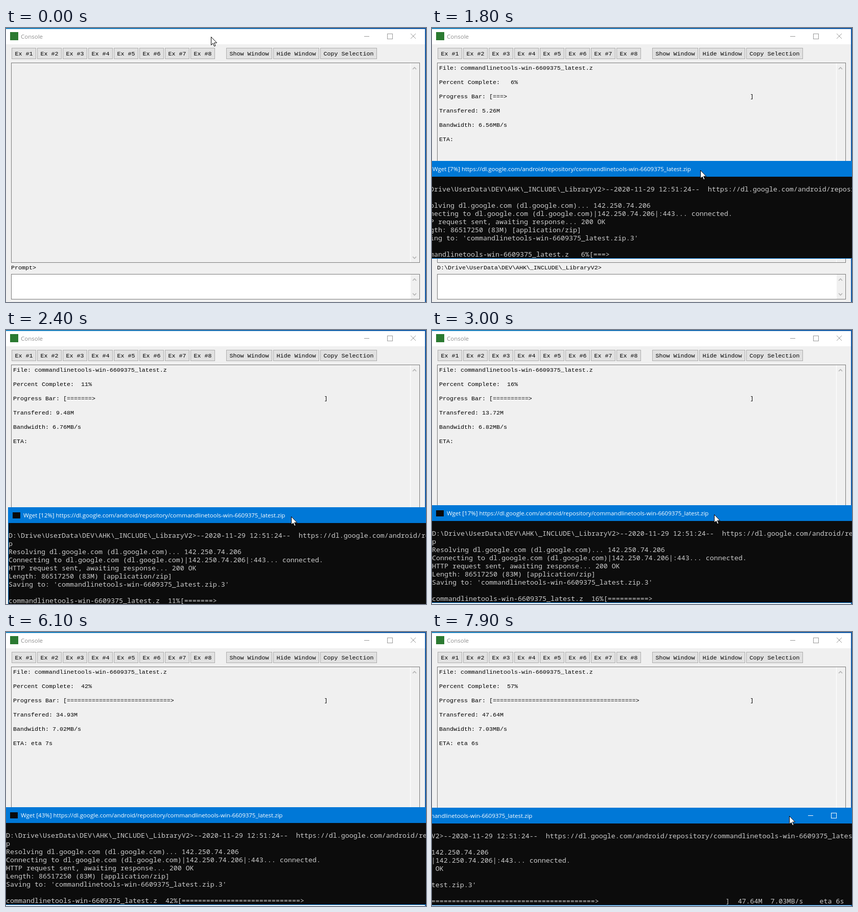
Recreate the animation shown at these times as an HTML page. Size 822 by 538 pixels, loop 8000 ms.

```html
<!DOCTYPE html>
<html lang="en">
<head>
<meta charset="utf-8">
<title>Console</title>
<style>
  html, body { margin: 0; width: 100%; height: 100%; overflow: hidden; background: #f0f0f0; }
  svg { display: block; }
  text { white-space: pre; }
  .mono { font: 11.667px "Liberation Mono", "Courier New", monospace; fill: #000; }
  .ui { font: 11.5px "Open Sans", "Noto Sans", sans-serif; }
  .term { font: 13.333px "Noto Sans Mono", "DejaVu Sans Mono", monospace; fill: #ccc; }
</style>
</head>
<body>
<svg id="stage" width="822" height="538" viewBox="0 0 822 538">
  <defs>
    <linearGradient id="desk">
      <stop offset="0" stop-color="#1c86c2"/>
      <stop offset="1" stop-color="#1058a6"/>
    </linearGradient>
  </defs>
</svg>
<script>
const LOOP = 8000;
const SIZE = 86517250 / 1048576;
const BAR = 72;
const FILE = "commandlinetools-win-6609375_latest.z";
const URL_TEXT = "https://dl.google.com/android/repository/" + FILE + "ip";
const PATH = "D:\\Drive\\UserData\\DEV\\AHK\\_INCLUDE\\_LibraryV2>";

// [time, value, ...] keys
const LOADED = [[1000, 0.02], [1400, 2.58], [1800, 5.26], [2400, 9.48], [4400, 23.6], [6000, 34.93], [7800, 47.64], [8000, 49.05]];
const SPEED = [[1000, 6.3], [1400, 6.46], [1800, 6.56], [2400, 6.76], [4400, 6.95], [6000, 7.02], [7800, 7.03]];
const TERMINAL = [[1600, 500, 400], [1700, 150, 305], [1800, -29, 261], [2100, -6, 318], [2400, 4, 348],
  [2800, -1, 344], [7000, -1, 344], [7200, -50, 346], [7700, -290, 346], [7900, -346, 345], [8000, -356, 345]];
const POINTER = [[0, 401, 17], [100, 401, 17], [450, 380, 47], [800, 384, 48], [900, 420, 60], [1300, 840, 400], [1600, 1054, 418]];

const stage = document.getElementById("stage");

function add(parent, tag, attrs, content = "") {
  const el = document.createElementNS("http://www.w3.org/2000/svg", tag);
  for (const key in attrs) el.setAttribute(key, attrs[key]);
  el.textContent = content;
  parent.appendChild(el);
  return el;
}
const rect = (p, x, y, width, height, fill) => add(p, "rect", { x, y, width, height, fill });
const box = (p, x, y, w, h, fill, stroke) =>
  add(p, "rect", { x: x + .5, y: y + .5, width: w - 1, height: h - 1, fill, stroke });
const label = (p, cls, x, y, content) => add(p, "text", { class: cls, x, y }, content);
const line = (p, d, stroke, width = 1) =>
  add(p, "path", { d, stroke, fill: "none", "stroke-width": width });

function captionButtons(p, x, y, color) {
  line(p, `M${x} ${y + 5.5}h10`, color);
  box(p, x + 45, y, 11, 11, "none", color);
  line(p, `M${x + 91} ${y}l10 10m0-10l-10 10`, color);
}

function scrollBar(p, y, h, up, down) {
  rect(p, 791, y, 18, h, "#f0f0f0");
  line(p, `M791.5 ${y}v${h}`, "#fff");
  line(p, `M796 ${up + 2}l3.5-3.5 3.5 3.5M796 ${down - 2}l3.5 3.5 3.5-3.5`, "#b5b5b5", 1.7);
}

function sample(keys, t) {
  if (t <= keys[0][0]) return keys[0].slice(1);
  const i = keys.findIndex(k => k[0] > t);
  if (i < 0) return keys[keys.length - 1].slice(1);
  const a = keys[i - 1], b = keys[i];
  const u = (t - a[0]) / (b[0] - a[0]);
  return a.slice(1).map((v, n) => v + (b[n + 1] - v) * u);
}

// main window
rect(stage, 0, 0, 822, 538, "url(#desk)");
rect(stage, 0, 2, 820, 30, "#fff");
rect(stage, 0, 32, 820, 506, "#f0f0f0");
rect(stage, 8, 8, 16, 16, "#2b7a31");
label(stage, "ui", 29, 21, "Console").setAttribute("fill", "#8f8f8f");
captionButtons(stage, 701, 11, "#999");

function button(x, w, caption) {
  const face = box(stage, x, 39, w, 22, "#e1e1e1", "#adadad");
  label(stage, "mono", x + (w - caption.length * 7) / 2, 54, caption);
  return face;
}
let lastExample;
for (let i = 0; i < 8; i++) lastExample = button(11 + 50 * i, 48, "Ex #" + (i + 1));
button(431, 90, "Show Window");
button(523, 90, "Hide Window");
button(615, 111, "Copy Selection");

box(stage, 10, 68, 800, 393, "#f0f0f0", "#7a7a7a");
scrollBar(stage, 69, 391, 79, 451);
const report = Array.from({ length: 6 }, (_, i) => label(stage, "mono", 14, 82 + 28 * i));
const prompt = label(stage, "mono", 10, 474);
box(stage, 10, 483, 800, 50, "#fff", "#7a7a7a");
scrollBar(stage, 484, 48, 494, 523);

// terminal window, drawn from its own top left corner
const terminal = add(stage, "g", {});
rect(terminal, 0, 0, 1202, 192, "#0078d7");
rect(terminal, 1, 31, 1200, 160, "#0c0c0c");
rect(terminal, 9, 10, 15, 12, "#0a0a0a");
const title = label(terminal, "ui", 30, 20);
title.setAttribute("fill", "#fff");
captionButtons(terminal, 1082, 10, "#fff");
const output = [
  PATH + "--2020-11-29 12:51:24--  " + URL_TEXT.slice(0, -1),
  "p",
  "Resolving dl.google.com (dl.google.com)... 142.250.74.206",
  "Connecting to dl.google.com (dl.google.com)|142.250.74.206|:443... connected.",
  "HTTP request sent, awaiting response... 200 OK",
  "Length: 86517250 (83M) [application/zip]",
  "Saving to: '" + FILE + "ip.3'",
  "",
  ""
].map((s, i) => label(terminal, "term", 1, 60 + 16 * i, s));
const progress = output[8];

const pointer = add(stage, "path", {
  d: "M.5.5V16.4L4.1 13 6.6 18.8 9 17.8 6.5 12.1H11.6Z", fill: "#fff", stroke: "#000", "stroke-width": 1
});

function etaAt(t) {
  if (t < 4000) return "";
  const tick = Math.floor(t / 1000) * 1000;
  const left = (SIZE - sample(LOADED, tick)[0]) / sample(SPEED, tick)[0];
  return "eta " + Math.round(left) + "s";
}

function pointerAt(t, [x, y]) {
  if (t < 1600) return sample(POINTER, t);
  if (t < 3000) return [x + 553.5, y + 18];
  if (t < 7000) return [552 + (t - 3000) / 10, 362 + (t - 3000) * .6];
  return [x + 1045, y + 16];
}

function draw(t) {
  const tick = Math.floor(t / 200) * 200;
  const loaded = sample(LOADED, tick)[0];
  const percent = Math.floor(loaded / SIZE * 100) + "%";
  const cells = Math.floor(loaded / SIZE * BAR);
  const bar = "[" + (cells ? "=".repeat(cells - 1) + ">" : "").padEnd(BAR) + "]";
  const amount = loaded.toFixed(2) + "M";
  const speed = sample(SPEED, tick)[0].toFixed(2) + "MB/s";
  const eta = etaAt(t);

  const rows = [
    "File: " + FILE,
    "Percent Complete:" + percent.padStart(5),
    "Progress Bar: " + bar,
    "Transfered: " + amount,
    "Bandwidth: " + speed,
    "ETA: " + eta
  ];
  report.forEach((el, i) => { el.textContent = t < 1000 ? "" : rows[i]; });
  prompt.textContent = t < 700 ? "Prompt>" : PATH;

  const hover = t >= 400 && t < 850;
  lastExample.setAttribute("fill", hover ? "#e5f1fb" : "#e1e1e1");
  lastExample.setAttribute("stroke", hover ? "#0078d7" : "#adadad");

  const place = sample(TERMINAL, t).map(Math.round);
  terminal.setAttribute("transform", `translate(${place})`);
  terminal.setAttribute("visibility", t < 1600 ? "hidden" : "visible");
  const live = Math.round(sample(LOADED, t)[0] / SIZE * 100 + .3);
  title.textContent = `Wget [${live}%] ${URL_TEXT}`;
  progress.textContent = FILE + percent.padStart(5) + bar + amount.padStart(8) + "  " + speed + "    " + eta;

  pointer.setAttribute("transform", `translate(${pointerAt(t, place).map(Math.round)})`);
}

function frame(now) {
  draw(Math.floor(now % LOOP / 100) * 100);
  requestAnimationFrame(frame);
}
draw(0);
requestAnimationFrame(frame);
</script>
</body>
</html>
```
